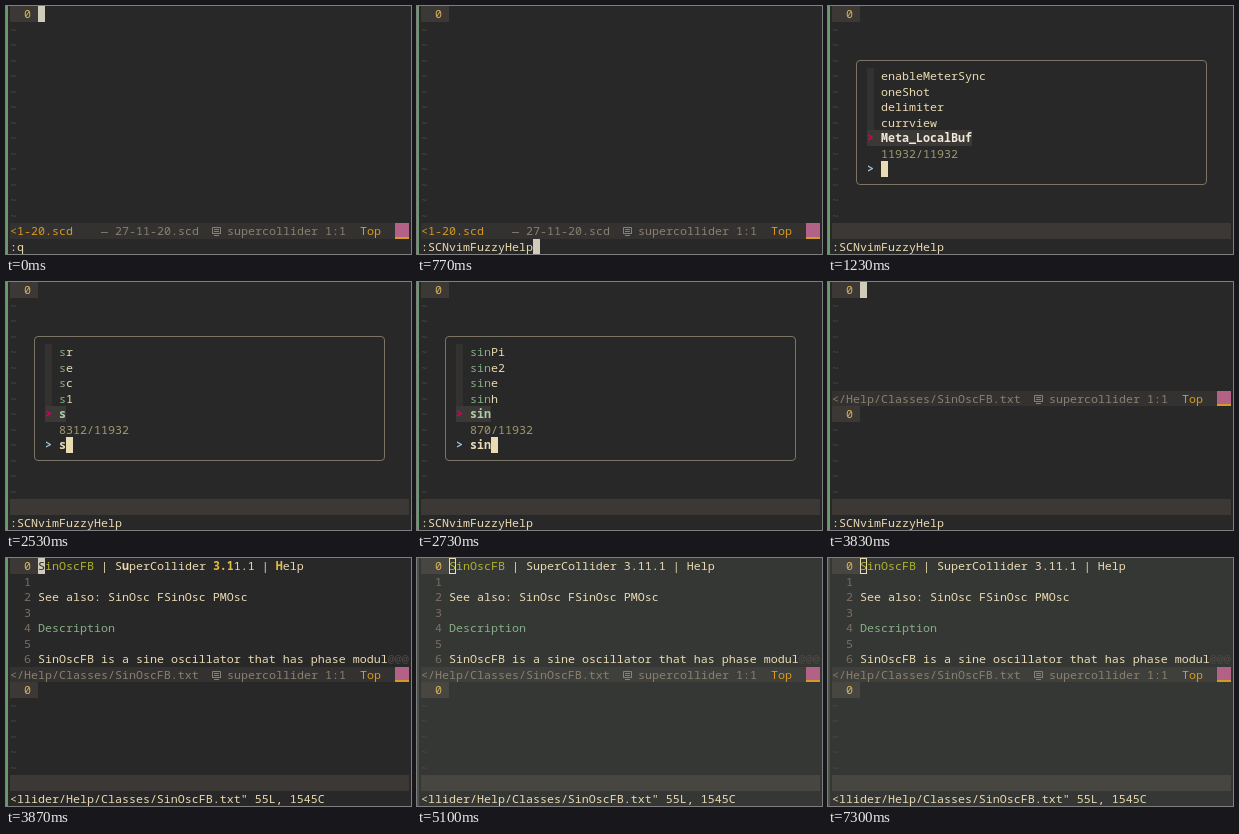
Write an HTML page that moves like this. It is 405 px wide and 248 px high and loops after 7410 ms.

```html
<!DOCTYPE html>
<html>
<head>
<meta charset="utf-8">
<style>
html, body { margin: 0; width: 100%; height: 100%; overflow: hidden; background: #282828; }
#term { position: relative; width: 405px; height: 248px; overflow: hidden;
  font: 11.667px/15.5px "Noto Sans Mono", "DejaVu Sans Mono", monospace; color: #ebdbb2; }
#term > * { position: absolute; white-space: pre; box-sizing: border-box; }
b { font-weight: 700; }
</style>
</head>
<body>
<div id="term"></div>
<script>
const LOOP = 7410, CW = 7, RH = 15.5, LEFT = 4;
const CREAM = '#ebdbb2', GREY = '#8a8071', DIM = '#504945', GOLD = '#d79921', GREEN = '#87af87', LIME = '#b0b32e';
const BAR = 'rgba(255,220,190,.09)', STATUS = 'rgba(255,220,190,.05)';
const term = document.getElementById('term');

const rows = (from, to, fn) => Array.from({ length: to - from + 1 }, (_, i) => fn(from + i)).join('');
const text = (row, col, str, color = CREAM, css = '') =>
  `<div style="left:${LEFT + col * CW}px;top:${row * RH}px;color:${color};${css}">${str}</div>`;
const box = (row, col, cols, color, css = '') =>
  `<div style="left:${LEFT + col * CW}px;top:${row * RH}px;width:${cols * CW}px;height:${RH}px;background:${color};${css}"></div>`;
const paint = (str, color) => `<span style="color:${color}">${str}</span>`;
const tildes = (from, to) => rows(from, to, r => text(r, 0, '~', DIM));
const lineZero = row => box(row, 0, 4, BAR) + text(row, 2, '0', '#d8b65c');

function status(row, name, extra = '') {
  const y = row * RH;
  return box(row, 0, 57, STATUS) + name + extra +
    `<svg style="left:206px;top:${y + 4}px" width="9" height="9" fill="none" stroke="${GREY}">
      <path d="M.5 6V.5H8.5V6M2 2.5H7M2 4.5H7M0 6.5H9M2 8.5H7"/></svg>` +
    text(row, 31, 'supercollider 1:1', GREY) + text(row, 50, 'Top', GOLD) +
    box(row, 55, 2, '#b16286', 'border-bottom:2px solid ' + GOLD);
}

const scdStatus = () => status(14, text(14, 0, '&lt;1-20.scd', GOLD), text(14, 13, '— 27-11-20.scd', GREY));

const SINOSC = ['FSinOsc', 'Meta_SinOscFB', 'Meta_SinOsc', 'SinOscFB', 'SinOsc'];
// start time, query, match count, items from top to bottom
const searches = [
  [1130, '', '', []],
  [1170, '', '0', []],
  [1230, '', '11932', ['enableMeterSync', 'oneShot', 'delimiter', 'currview', 'Meta_LocalBuf']],
  [2530, 's', '8312', ['sr', 'se', 'sc', 's1', 's']],
  [2700, 'si', '2204', ['size', 'sign', 'sinh', 'sine', 'sin']],
  [2730, 'sin', '870', ['sinPi', 'sine2', 'sine', 'sinh', 'sin']],
  [2930, 'sino', '9', SINOSC],
  [3070, 'sinos', '7', SINOSC],
  [3100, 'sinosc', '7', SINOSC]
];

function mark(str, query, color) {
  const at = str.toLowerCase().indexOf(query), end = at + query.length;
  return query ? str.slice(0, at) + paint(str.slice(at, end), color) + str.slice(end) : str;
}

function popup(t) {
  const [, query, count, items] = searches.filter(s => s[0] <= t).pop();
  const chosen = t < 3530 ? 4 : 3;
  let out = '<div style="left:28px;top:54px;width:351px;height:125px;border:1px solid #7c7566;border-radius:4px"></div>';
  if (!count) return out;
  items.forEach((item, i) => {
    const row = 4 + i, on = i === chosen;
    out += box(row, 5, on ? 2 + item.length : 1, on ? BAR : STATUS);
    if (on) out += text(row, 5, '<b>&gt;</b>', '#d7005f');
    const label = mark(item, query, on ? '#a9cfa9' : GREEN);
    out += text(row, 7, on ? `<b>${label}</b>` : label, on ? '#f0eadc' : CREAM);
  });
  return out + text(9, 7, count + (items.length ? '/11932' : '/0'), '#a09a70') +
    text(10, 5, '<b>&gt;</b>', '#9fc0cf') + text(10, 7, `<b>${query}</b>`) +
    box(10, 7 + query.length, 1, CREAM);
}

function editor(t) {
  const picking = t >= 1130 && t < 3800;
  let out = lineZero(0) + tildes(1, 13);
  out += picking ? box(14, 0, 57, BAR) + popup(t) : scdStatus();
  const cmd = t < 30 ? ':q' : t < 370 ? ':' : t < 770 ? ':S' : ':SCNvimFuzzyHelp';
  out += text(15, 0, cmd);
  if (t < 30 || t >= 3800) out += box(0, 4, 1, '#d0cbbb');
  else if (!picking) out += box(15, cmd.length, 1, '#d0cbbb');
  return out;
}

function help(t) {
  const loaded = t >= 3870, focused = t < 4900;
  let out = lineZero(0);
  if (loaded) {
    const hint = (s, c) => focused ? `<b>${paint(s, c)}</b>` : s;
    out += text(0, 4, paint('SinOscFB', LIME) + ` | S${hint('u', CREAM)}perCollider ` +
      `${hint('3.1', '#e0c040')}1.1 | ${hint('H', '#e0c040')}elp`);
    out += rows(1, 6, r => text(r, 2, r, '#7c6f64'));
    out += text(2, 4, 'See also: SinOsc FSinOsc PMOsc') + text(4, 4, 'Description', GREEN);
    out += text(6, 4, 'SinOscFB is a sine oscillator that has phase modul' + paint('@@@', DIM));
  } else out += tildes(1, 6);
  out += status(7, text(7, 0, '&lt;/Help/Classes/SinOscFB.txt', GREY));
  out += lineZero(8) + tildes(9, 13) + box(14, 0, 57, BAR);
  out += text(15, 0, loaded ? '&lt;llider/Help/Classes/SinOscFB.txt" 55L, 1545C' : ':SCNvimFuzzyHelp');
  if (t < 4400) out += box(0, 4, 1, '#d0cbbb') + (loaded ? text(0, 4, 'S', '#282828') : '');
  else if (!focused) out += box(0, 4, 1, 'none', 'border:1px solid ' + CREAM);
  return out;
}

let shown = '';
function frame(now) {
  const t = now % LOOP;
  // the window turns slightly translucent in four steps when it loses focus
  const fade = [4900, 4970, 5030, 5100].filter(s => s <= t).length / 4;
  const mix = (a, b) => Math.round(a + (b - a) * fade);
  const bg = `rgb(${mix(40, 53)},${mix(40, 55)},${mix(40, 53)})`;
  const edge = fade ? '#4a524a' : '#6a9a6c';
  const html = `<div style="width:405px;height:248px;background:${bg};border-left:2px solid ${edge}"></div>` +
    (t < 3830 ? editor(t) : help(t));
  if (html !== shown) term.innerHTML = shown = html;
  requestAnimationFrame(frame);
}
frame(0);
</script>
</body>
</html>
```
